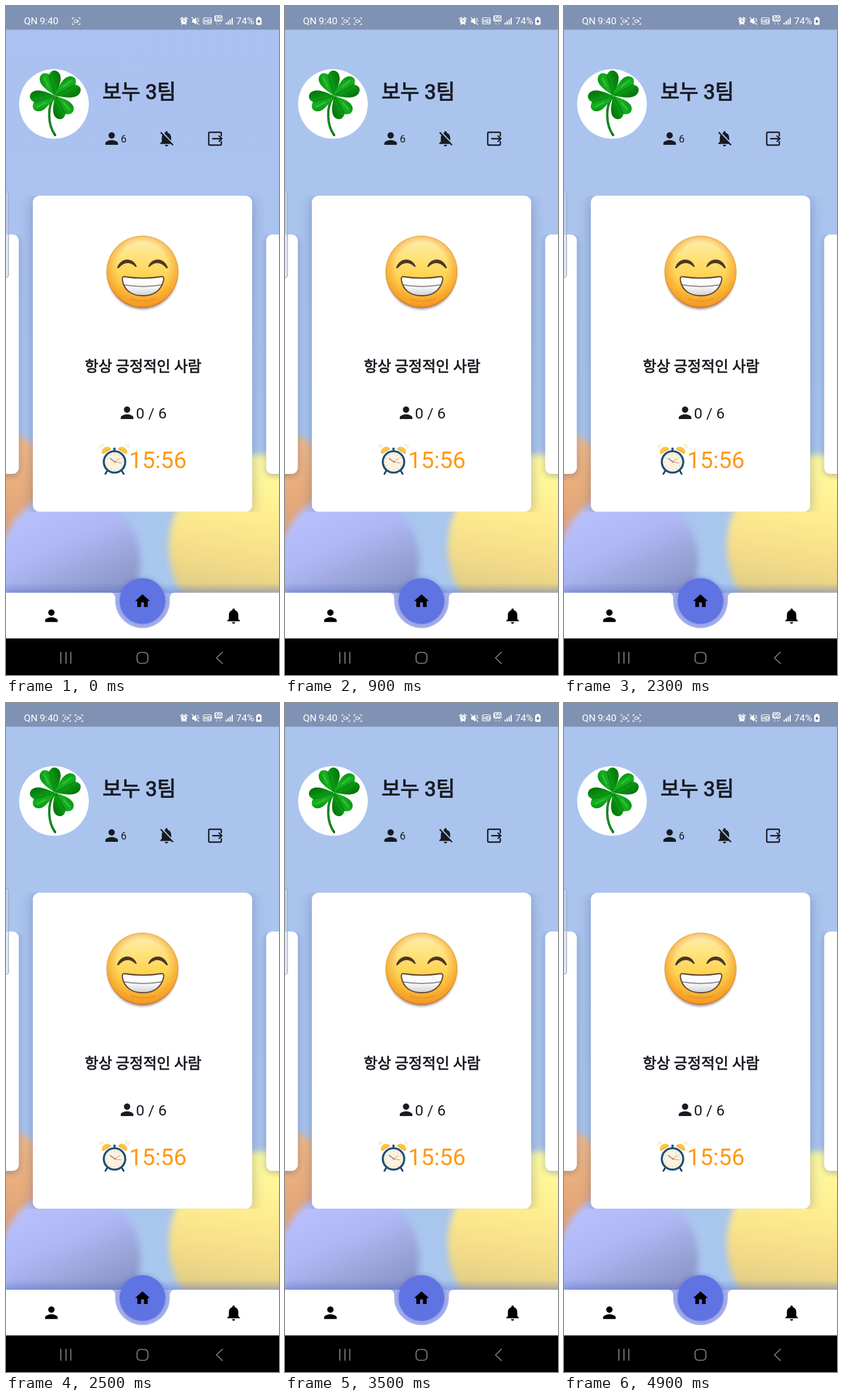
These frames come from a looping animation (478x1171 px, 5.3 s). An HTML page with a canvas:

```html
<!DOCTYPE html>
<html lang="ko">
<head>
<meta charset="utf-8">
<title>Home screen</title>
<style>
  html, body { margin: 0; width: 100%; height: 100%; overflow: hidden; background: #aac4ee; }
  canvas { display: block; width: 478px; height: 1171px; }
</style>
</head>
<body>
<canvas id="stage" width="478" height="1171"></canvas>
<script>
const W = 478, H = 1171, LOOP = 5300, TAU = Math.PI * 2;
const INK = '#191b22';
const FONT = 'Roboto, "Noto Sans CJK KR", "Noto Sans CJK", sans-serif';
const ICON = {
  person: 'M12 12c2.21 0 4-1.79 4-4s-1.79-4-4-4-4 1.79-4 4 1.79 4 4 4zm0 2c-2.67 0-8 1.34-8 4v2h16v-2c0-2.66-5.33-4-8-4z',
  home: 'M10 20v-6h4v6h5v-8h3L12 3 2 12h3v8z',
  bell: 'M12 22c1.1 0 2-.9 2-2h-4c0 1.1.89 2 2 2zm6-6v-5c0-3.07-1.64-5.64-4.5-6.32V4c0-.83-.67-1.5-1.5-1.5s-1.5.67-1.5 1.5v.68C7.63 5.36 6 7.92 6 11v5l-2 2v1h16v-1l-2-2z',
  muted: 'M20 18.69L7.84 6.14 5.27 3.49 4 4.76l2.8 2.8c-.52.99-.8 2.16-.8 3.43v5l-2 2v1h13.73l2 2L21 19.72zM12 22c1.11 0 2-.89 2-2h-4c0 1.11.89 2 2 2zm6-7.32V11c0-3.08-1.64-5.64-4.5-6.32V4c0-.83-.67-1.5-1.5-1.5s-1.5.67-1.5 1.5v.68c-.5.12-1 .31-1.43.55z'
};

const screen = document.getElementById('stage').getContext('2d');
let g;

function layer(draw) {
  const c = document.createElement('canvas');
  c.width = W; c.height = H;
  g = c.getContext('2d');
  draw();
  return c;
}

function grad(x0, y0, x1, y1, ...colors) {
  const f = g.createLinearGradient(x0, y0, x1, y1);
  colors.forEach((c, i) => f.addColorStop(i / (colors.length - 1), c));
  return f;
}

function disc(x, y, r, fill, ry = r) {
  g.fillStyle = fill;
  g.beginPath();
  g.ellipse(x, y, r, ry, 0, 0, TAU);
  g.fill();
}

function box(x, y, w, h, r, fill) {
  g.fillStyle = fill;
  g.beginPath();
  g.roundRect(x, y, w, h, r);
  g.fill();
}

function line(d, color, width) {
  g.strokeStyle = color;
  g.lineWidth = width;
  g.stroke(new Path2D(d));
}

function shape(d, fill) {
  g.fillStyle = fill;
  g.fill(new Path2D(d));
}

function text(s, x, y, size, color, weight = 400) {
  g.font = `${weight} ${size}px ${FONT}`;
  g.fillStyle = color;
  g.fillText(s, x, y);
}

// Medium weight, built from the regular face plus a thin outline.
function heading(s, x, y, size) {
  text(s, x, y, size, INK);
  g.strokeStyle = INK;
  g.lineWidth = size * .034;
  g.strokeText(s, x, y);
}

function icon(name, x, y, scale, color = INK) {
  g.save();
  g.translate(x, y);
  g.scale(scale, scale);
  g.translate(-12, -12);
  shape(ICON[name], color);
  g.restore();
}

function backdrop() {
  g.fillStyle = grad(0, 0, 0, 1030, '#aac4ee', '#aac4ee', '#a9c7ef');
  g.fillRect(0, 0, W, H);
  g.filter = 'blur(6px)';
  disc(-13, 841, 96, grad(40, 750, 0, 920, '#f0bb8c', '#ebae7c', '#dda078'));
  disc(446, 946, 161, grad(440, 800, 400, 1060, '#fffb9e', '#ffee90', '#f3db88', '#d8c885'));
  disc(113, 972, 122, grad(85, 870, 175, 1060, '#b7bffb', '#afb8f6', '#98a3d6', '#838dc2'));
  g.filter = 'none';
}

function card(x, y, w, h, r, shadow) {
  g.save();
  g.beginPath();
  g.rect(0, y, W, h + (shadow > 12 ? 0 : 12));
  g.clip();
  g.shadowColor = 'rgba(50,70,125,.36)';
  g.shadowBlur = shadow;
  g.shadowOffsetY = 3;
  box(x, y, w, h, r, '#fff');
  g.restore();
}

function leaf(angle, length, width) {
  g.save();
  g.translate(86, 157);
  g.rotate(angle);
  const d = `M0 0C${length * .25} ${-width * .45} ${length * .6} ${-width * 1.15} ${length * .88} ${-width * .85}` +
    `Q${length * 1.12} ${-width * .5} ${length * .9} 0Q${length * 1.12} ${width * .5} ${length * .88} ${width * .85}` +
    `C${length * .6} ${width * 1.15} ${length * .25} ${width * .45} 0 0Z`;
  shape(d, grad(0, -width, 0, width, '#08920f', '#18b022', '#078c10', '#046f0a'));
  line(`M3 0L${length * .85} 0`, '#05700c', 1);
  line(`M${length * .45} ${-width * .35}L${length * .82} ${-width * .5}`, 'rgba(80,215,85,.45)', 3);
  g.restore();
}

function clover() {
  disc(84, 171.5, 61, '#fff');
  line('M84 160C72 177 73 208 86 226', '#08720f', 4);
  line('M83 162C72 179 73 205 84 223', '#1d9a26', 1.5);
  leaf(-1.85, 43, 20);
  leaf(-.5, 45, 20);
  leaf(2.85, 43, 20);
  leaf(1.05, 41, 20);
}

function header() {
  clover();
  heading('보누 3팀', 169, 163, 36);
  icon('person', 185, 232, 1.38);
  text('6', 201, 239, 18, INK);
  icon('muted', 281, 232, 1.37);
  line('M377 227V223Q377 221 375 221H357Q355 221 355 223V241.5Q355 243.5 357 243.5H375Q377 243.5 377 241.5V237.5M362 232.2H378M373 227.5L378 232.2L373 237', INK, 2.4);
}

function smiley() {
  g.save();
  g.filter = 'blur(2px)';
  disc(239, 468, 61, 'rgba(90,75,65,.65)', 62.5);
  g.restore();
  disc(239, 465, 63, grad(0, 402, 0, 528, '#e9b443', '#eca52b', '#d9721a'));
  disc(239, 465, 61.3, grad(0, 404, 0, 526, '#ffedb0', '#ffe482', '#fed75a', '#fdc840', '#f9ac2e'));
  const rim = g.createRadialGradient(239, 458, 44, 239, 463, 64);
  rim.addColorStop(0, 'rgba(240,138,30,0)');
  rim.addColorStop(1, 'rgba(240,138,30,.6)');
  disc(239, 465, 61.3, rim);
  for (const side of [-1, 1]) {
    g.save();
    g.translate(239, 0);
    g.scale(side, 1);
    shape('M11 454C18 440 37 440 44 457C45 460 42 460 40 457C32 448 22 448 14 455C11 458 9 457 11 454Z', '#4d3624');
    g.restore();
  }
  const mouth = 'M208 474Q240 479 271 474Q277 473 276 479C272 499 257 507 240 507C222 507 207 499 204 480Q203 473 208 474Z';
  line(mouth, '#b87525', 3);
  shape(mouth, grad(0, 474, 0, 507, '#fff', '#fbfbfb', '#cfd0d4'));
  line('M206 488Q240 494 273 488', '#8f8c89', 1.8);
  line(mouth, '#5f493a', 1.8);
  line('M219 513Q240 520 261 513', 'rgba(232,137,30,.5)', 3);
}

function alarmClock() {
  g.save();
  g.translate(.5, 1);
  for (const side of [-1, 1]) {
    g.save();
    g.translate(189.5, 0);
    g.scale(side, 1);
    line('M13 813L16 818', '#163f63', 3);
    line('M22 771L20 766M25 772L25 767', '#ecd6a2', 1.2);
    shape('M6 775C7 770 15 769 19 773C23 777 23 781 21 783Z', '#fdc445');
    line('M8 774.5L20 782.5', '#eaa832', 1.2);
    g.restore();
  }
  box(187.5, 772, 4, 5, 1, '#2b5c86');
  disc(189.5, 797, 20.6, '#1d5079');
  disc(189.5, 797, 17, '#fdf2de');
  g.fillStyle = '#b9aa93';
  for (let i = 0; i < 12; i++) {
    const a = i * TAU / 12;
    g.fillRect(189 + 14 * Math.cos(a), 796.5 + 14 * Math.sin(a), 1.2, 1.2);
  }
  line('M190 797L182 791', '#5b7287', 1.5);
  line('M190 797L201 799', '#a09a93', 1.1);
  line('M190 797L198 791', '#f0a273', 1.2);
  disc(190, 797, 1.7, '#d8805f');
  g.restore();
}

function cards() {
  card(-40, 400, 62.5, 419, 11, 12);
  card(455.5, 400, 70, 419, 11, 12);
  card(47, 332, 384, 553.5, 12, 22);
  g.fillStyle = 'rgba(205,215,240,.55)';
  g.strokeStyle = '#98a4ba';
  g.lineWidth = 1.2;
  g.beginPath();
  g.roundRect(-8, 325, 12.5, 150, 4);
  g.fill();
  g.stroke();
  smiley();
  heading('항상 긍정적인 사람', 138, 640, 26);
  icon('person', 212, 712, 1.38);
  text('0 / 6', 227.5, 722, 26.5, INK);
  alarmClock();
  text('15:56', 215.5, 809, 40.5, '#ff9914');
}

function tabBar() {
  g.fillStyle = grad(0, 1010, 0, 1027, 'rgba(85,105,205,0)', 'rgba(85,105,205,.42)');
  g.fillRect(0, 1010, W, 17);
  g.fillStyle = '#a8b2ee';
  g.fillRect(180, 1027, 118, 68);
  shape('M0 1027H183Q191 1027 191.2 1037V1041A47.8 47.8 0 0 0 286.8 1041V1037Q287 1027 295 1027H478V1107H0Z', '#fff');
  g.save();
  g.shadowColor = 'rgba(70,85,180,.45)';
  g.shadowBlur = 10;
  disc(239, 1041.5, 40, '#5f73e3');
  g.restore();
  icon('person', 79.5, 1067.3, 1.38, '#000');
  icon('home', 239, 1041.5, 1.3, '#000');
  icon('bell', 398.5, 1067.5, 1.37, '#000');
  g.fillStyle = '#000';
  g.fillRect(0, 1107, W, 64);
  line('M96 1131V1150.5M105 1131V1150.5M113.5 1131V1150.5M379 1131L368.5 1141L379 1151', '#8b8b8b', 1.7);
  g.beginPath();
  g.roundRect(229.5, 1131.5, 19, 19, 6);
  g.stroke();
}

function statusBar() {
  g.fillStyle = '#8092b3';
  g.fillRect(0, 0, W, 41.5);
  text('QN', 31.5, 32, 17, '#fff');
  text('9:40', 59, 32, 17, '#fff');
  text('74%', 403, 32, 17, '#fff');
  // alarm and muted speaker
  disc(311.5, 26.5, 5.2, '#fff');
  line('M305.5 22.5L309 20M317.5 22.5L314 20M308 32L309 30.5M315 32L314 30.5', '#fff', 1.8);
  line('M311.5 23.5V27H314', '#8092b3', 1.2);
  shape('M326 24H328.5L333 20V32.5L328.5 29H326Z', '#fff');
  line('M325.5 20L337.5 32.5M335 22.5H337.5M335 26H338', '#fff', 1.3);
  g.strokeStyle = '#fff';
  g.lineWidth = 1.2;
  g.beginPath();
  g.roundRect(345.5, 20.5, 14, 11, 2.5);
  g.stroke();
  text('HD', 347, 29.5, 9, '#fff', 700);
  box(365, 16.5, 14, 10.5, 2, '#fff');
  text('5G', 366.4, 25.4, 9.5, '#65779b', 700);
  line('M369.5 33V28.5L367.5 30.5M374.5 28V32.5L376.5 30.5', 'rgba(255,255,255,.5)', 1);
  for (let i = 0; i < 4; i++) box(384.5 + i * 3.5, 29 - i * 2.8, 2, 3.5 + i * 2.8, .6, '#fff');
  box(440.5, 19, 4.5, 3, 1, '#fff');
  box(438, 20.5, 9.5, 12.5, 2, '#fff');
  shape('M443.5 22.5L440 27.5H442.4L441.8 31L445.5 26H443Z', '#3b4861');
}

// Screen capture badge: corner brackets around a small camera.
function badge(x, frame, camera) {
  g.save();
  g.translate(x, 26.5);
  g.globalAlpha = frame;
  line('M-6.5 -3.2V-6H-3.5M3.5 -6H6.5V-3.2M6.5 3.2V6H3.5M-3.5 6H-6.5V3.2', '#fff', 1.2);
  g.globalAlpha = camera;
  g.strokeStyle = '#fff';
  g.lineWidth = 1.1;
  g.beginPath();
  g.roundRect(-3.5, -2.5, 5, 5, 1);
  g.stroke();
  shape('M1.5 0L4.2 -2.2V2.2Z', '#fff');
  g.restore();
}

const back = layer(backdrop);
const front = layer(() => {
  g.lineCap = 'round';
  g.lineJoin = 'round';
  header();
  cards();
  tabBar();
  statusBar();
});

const ramp = (t, from, to) => Math.min(1, Math.max(0, (t - from) / (to - from)));

function render(now) {
  const t = Math.floor((now % LOOP) / 100) * 100;
  g = screen;
  g.drawImage(back, 0, 0);
  if (t < 400) {
    g.globalAlpha = t < 200 ? 1 : .5;
    g.fillStyle = grad(0, 42, 0, 760, 'rgba(172,188,244,.4)', 'rgba(172,188,244,0)');
    g.fillRect(0, 42, W, 718);
    g.globalAlpha = 1;
  }
  g.drawImage(front, 0, 0);
  const enter = ramp(t, 0, 200);
  const fade = .06 + .94 * enter;
  const blink = t < 1900 ? 1 - ramp(t, 1200, 1500) : 1;
  badge(105.5 + enter, fade, fade * blink);
  badge(123 + 4.5 * enter, 1, 1);
}

const start = performance.now();
function tick() {
  render(performance.now() - start);
  requestAnimationFrame(tick);
}
tick();
</script>
</body>
</html>
```
